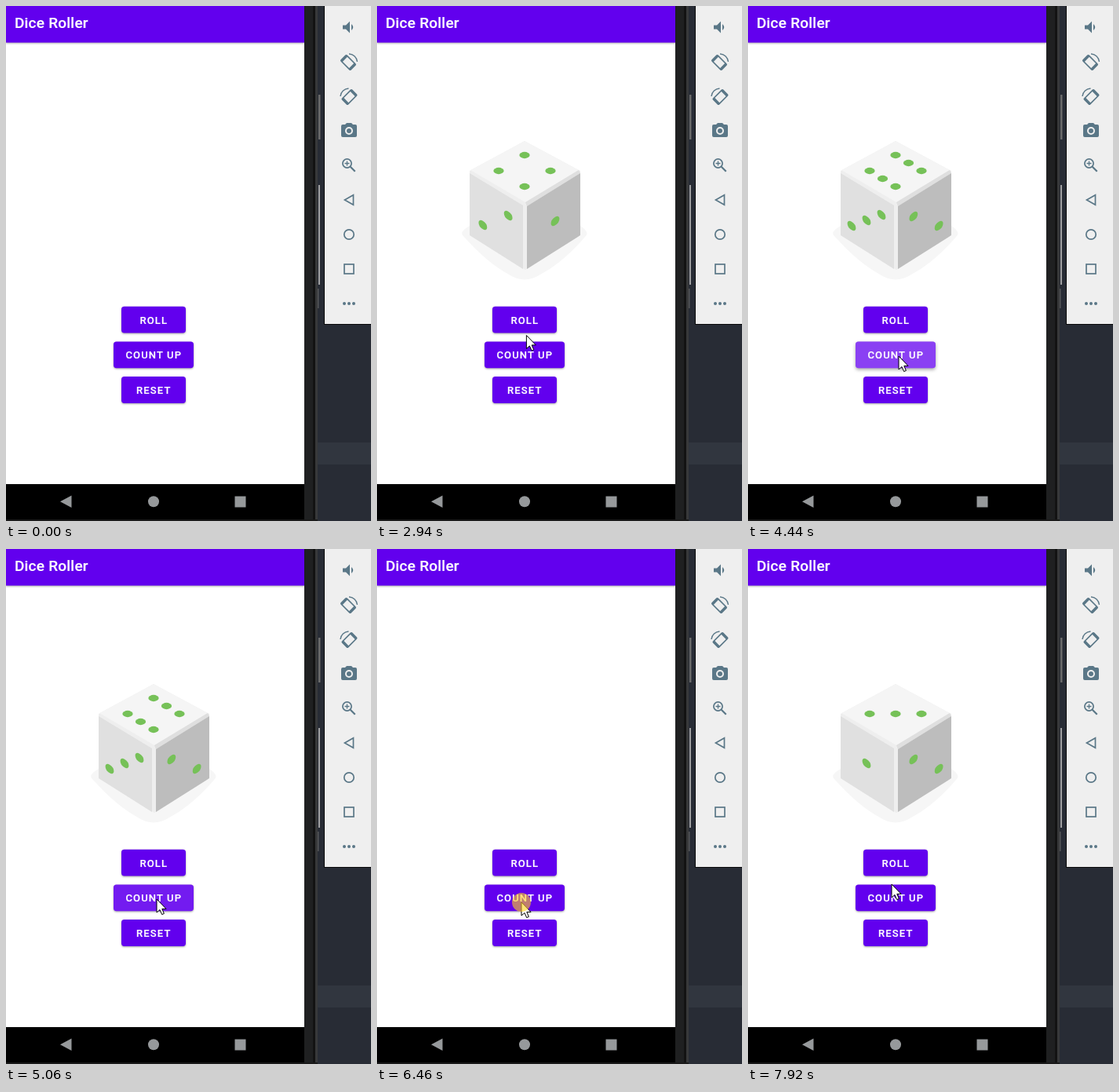
These frames come from a looping animation (465x656 px, 7990 ms). An HTML page:

```html
<!DOCTYPE html>
<html lang="en">
<head>
<meta charset="utf-8">
<title>Dice Roller</title>
<style>
html, body { margin: 0; width: 100%; height: 100%; overflow: hidden; background: #282c35; }
svg { display: block; width: 465px; height: 656px; }
text { font-family: Roboto, sans-serif; font-weight: 500; fill: #fff; stroke: #fff; stroke-width: .2; }
.btn text { font-size: 13px; letter-spacing: 1.16px; text-anchor: middle; }
.icons { fill: none; stroke: #5a7787; stroke-width: 1.7; }
.icons .solid { fill: #5a7787; stroke: none; }
</style>
</head>
<body>
<svg viewBox="0 0 465 656">
  <!-- desktop behind the emulator -->
  <rect x="397" y="556" width="68" height="28" fill="#31363f"/>

  <!-- phone edge -->
  <rect x="380" width="17" height="656" fill="#1f2021"/>
  <rect x="391" width="3" height="656" fill="#131313"/>
  <rect x="394" width="3" height="656" fill="#38393a"/>
  <rect x="398" y="113" width="2.5" height="57" fill="#6b6b6b"/>
  <rect x="398" y="228" width="2" height="127" fill="#a0a0a2"/>
  <rect x="397" y="360" width="1.5" height="25" fill="#55575b"/>

  <!-- app -->
  <rect width="380" height="609" fill="#fff"/>
  <rect width="380" height="46.6" fill="#6200ee" style="filter:drop-shadow(0 1px 1px #0005)"/>
  <text x="10.9" y="28" font-size="19" letter-spacing=".22">Dice Roller</text>
  <rect y="609" width="380" height="47"/>
  <rect y="654" width="397" height="2" fill="#1a1a1a"/>
  <g fill="#96999b">
    <path d="M69 631.2 83.5 623.5V639Z"/>
    <circle cx="188" cy="631.3" r="7"/>
    <rect x="291.5" y="624.5" width="14" height="14"/>
  </g>

  <!-- die -->
  <g id="die">
    <path fill="#f6f6f6" d="M118 280Q104 288 110 293 140 327 168 342 188 355 208 342 237 327 266 293 271 288 259 280Z"/>
    <path fill="#eee" d="M188 172 259 210V292L189 336 118 292V210Z"/>
    <path fill="#f5f5f5" d="M188 172 257 209 189 250 119 209Z"/>
    <path fill="#dfdfdf" d="M189 250 257 209 259 213 191 255Z"/>
    <path fill="#e0e0e0" d="M118 213 186 254V335L118 292Z"/>
    <path fill="#bdbdbd" d="M191 255 259 213V292L191 335Z"/>
    <g fill="#76c158">
      <g id="top" transform="matrix(16.5 10 -16.5 10 188 210)"/>
      <g id="left" transform="matrix(19 11.5 0 18.5 151 273)"/>
      <g id="right" transform="matrix(19 -11.5 0 18.5 227 274)"/>
    </g>
  </g>

  <g id="buttons"/>

  <!-- emulator toolbar -->
  <rect x="405" width="60" height="406" fill="#0a0a0b"/>
  <rect x="406" width="59" height="405" fill="#efefef"/>
  <g class="icons">
    <path class="solid" d="M429 24.5H433L438 19.5V34.5L433 29.5H429ZM440 23Q444.5 27 440 31Z"/>
    <g id="turn">
      <g transform="translate(436 72) rotate(45)">
        <rect x="-8.5" y="-5" width="17" height="10" rx="1"/>
        <path d="M-7.3-5V5M7.3-5V5" stroke-width="3"/>
      </g>
      <path d="M437 61A11 11 0 0 1 447.5 71" stroke-width="1.4"/>
    </g>
    <use href="#turn" transform="translate(873.5 44) scale(-1 1)"/>
    <path class="solid" d="M432 151 434 149H440L442 151H445Q447 151 447 153V165Q447 167 445 167H429Q427 167 427 165V153Q427 151 429 151Z"/>
    <circle cx="437" cy="159" r="4" stroke="#efefef" stroke-width="2"/>
    <circle cx="434.5" cy="200.5" r="5.6"/>
    <path d="M438.7 204.7 444.7 210.7" stroke-width="2.2"/>
    <path d="M431.5 200.5H437.5M434.5 197.5V203.5" stroke-width="1.3"/>
    <path d="M431.5 247 442.5 240.8V253.2Z"/>
    <circle cx="437" cy="291" r="6.2"/>
    <rect x="431" y="329" width="12" height="12"/>
    <path d="M431 379H444" stroke-width="4" stroke-linecap="round" stroke-dasharray="0 6"/>
  </g>

  <path id="cursor" d="M0 0V17L4 13.5 6.7 19.6 9.4 18.4 6.8 12.4H12Z" fill="#fff" stroke="#000"/>
  <circle id="halo" r="12" fill="#ffd21e" opacity=".6"/>
</svg>
<script>
const LOOP = 7990, HALO = 130, REACT = 175, FADE = 420;
const $ = id => document.getElementById(id);
const clamp = x => Math.min(1, Math.max(0, x));
const show = (id, on) => $(id).style.display = on ? '' : 'none';

const BUTTONS = ['ROLL', 'COUNT UP', 'RESET'].map((label, i) =>
  ({ label, w: i === 1 ? 102 : 82, y: 382.7 + 44.7 * i }));

// What each button makes of the die's value; 0 is the empty die
const rolls = [6, 4];
const ACTIONS = [() => rolls.shift(), v => Math.min(6, v + 1), () => 0];

// Press time and button
let value = 0;
const CLICKS = [[1030, 0], [2440, 0], [3410, 1], [4230, 1], [4720, 1],
  [5690, 2], [6430, 1], [7080, 1], [7430, 1]]
  .map(([time, button]) => ({ time, button, value: value = ACTIONS[button](value) }));

// Pointer moves: start, end, target
const ENTRY = [429, 598];
const MOVES = [[200, 830, 189, 397], [2700, 3210, 192, 446], [5180, 5600, 182, 485],
  [6100, 6360, 184, 450], [7740, 7920, 183, 427]];

$('buttons').innerHTML = BUTTONS.map(({ label, w, y }, i) => {
  const box = `x="${188 - w / 2}" y="${y}" width="${w}" height="33.8" rx="3.7"`;
  return `<clipPath id="clip${i}"><rect ${box}/></clipPath>
    <g class="btn"><rect id="base${i}" ${box} fill="#6200ee"/>
    <g clip-path="url(#clip${i})"><circle id="ripple${i}" fill="#fff"/></g>
    <text x="188.3" y="${y + 21.8}">${label}</text></g>`;
}).join('');

// Pips in face units: centre, one diagonal, the other, then the middle pair
function pips(n, diagonal) {
  const d = n === 2 ? .85 : 1, at = [];
  if (n % 2) at.push([0, 0]);
  if (n > 1) at.push([d, d * diagonal], [-d, -d * diagonal]);
  if (n > 3) at.push([d, -d * diagonal], [-d, d * diagonal]);
  if (n > 5) at.push([0, 1], [0, -1]);
  return at.map(([x, y]) => `<circle cx="${x}" cy="${y}" r=".285"/>`).join('');
}

let shown = -1;
function showDie(n) {
  if (n === shown) return;
  shown = n;
  show('die', n);
  // Opposite faces add up to 7; 1, 2 and 3 follow each other around a corner
  const a = Math.min(n, 7 - n) % 3 + 1, b = a % 3 + 1;
  $('top').innerHTML = pips(n, -1);
  $('left').innerHTML = pips(n > 3 ? b : a, -1);
  $('right').innerHTML = pips(n > 3 ? a : b, 1);
}

function pointer(t) {
  let [x, y] = ENTRY;
  for (const [from, to, tx, ty] of MOVES) {
    const k = clamp((t - from) / (to - from)), e = k * k * (3 - 2 * k);
    x += (tx - x) * e;
    y += (ty - y) * e;
  }
  return [x, y];
}

function drawButton({ w }, i, t) {
  const click = CLICKS.findLast(c => c.button === i && t >= c.time);
  const age = click ? t - click.time : LOOP;
  const [x, y] = pointer(t - age);
  const ripple = $('ripple' + i);
  ripple.setAttribute('cx', x);
  ripple.setAttribute('cy', y);
  ripple.setAttribute('r', (Math.hypot(w / 2, 17) + 6) * Math.sqrt(clamp((age - 60) / 100)));
  ripple.setAttribute('opacity', .25 * clamp((FADE - age) / 190));
  const lift = clamp((age - 50) / 80) * clamp((250 - age) / 90);
  $('base' + i).style.filter =
    `drop-shadow(0 ${1 + 2.5 * lift}px ${1 + 2 * lift}px rgba(0,0,0,.35))`;
}

function draw(t) {
  const at = `translate(${pointer(t)})`;
  $('cursor').setAttribute('transform', at);
  $('halo').setAttribute('transform', at);
  show('cursor', t >= MOVES[0][0]);
  show('halo', CLICKS.some(c => t >= c.time && t < c.time + HALO));
  showDie(CLICKS.findLast(c => t >= c.time + REACT)?.value ?? 0);
  BUTTONS.forEach((b, i) => drawButton(b, i, t));
}

function tick(now) {
  draw(now % LOOP);
  requestAnimationFrame(tick);
}
draw(0);
requestAnimationFrame(tick);
</script>
</body>
</html>
```
